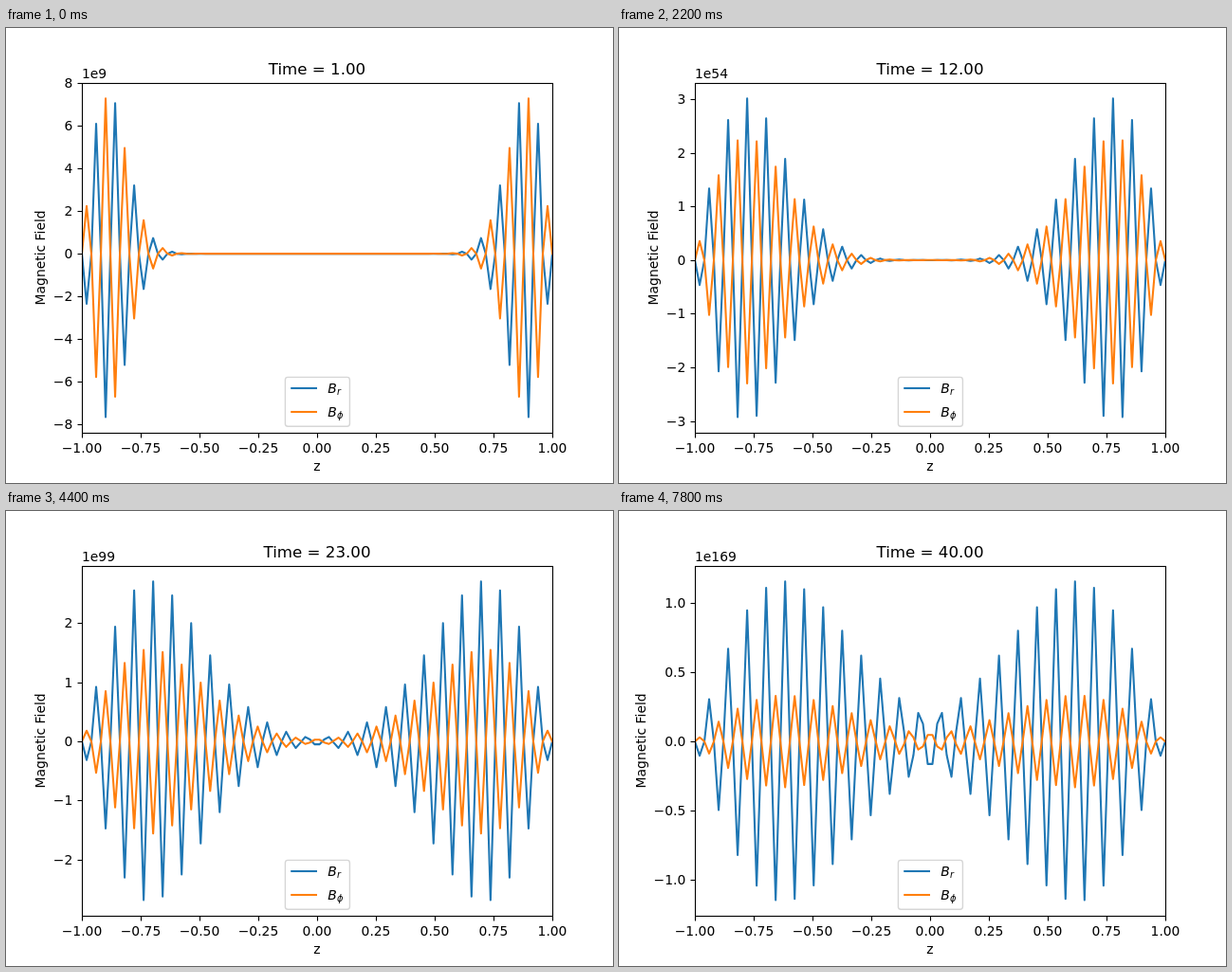
An HTML page with a canvas that plays this animation: 640x480 px, repeating every 8000 ms.

```html
<!DOCTYPE html>
<html lang="en">
<head>
<meta charset="utf-8">
<title>Magnetic field over time</title>
<style>
  html, body { margin: 0; width: 100%; height: 100%; overflow: hidden; background: #fff; }
  canvas { display: block; width: 640px; height: 480px; }
</style>
</head>
<body>
<canvas id="plot" width="640" height="480"></canvas>
<script>
const ctx = document.getElementById('plot').getContext('2d');

const STEP_MS = 200, STEPS = 40, POINTS = 100;
const LEFT = 80, RIGHT = 576, TOP = 57.6, BOTTOM = 427.2;
const WIDTH = RIGHT - LEFT, HEIGHT = BOTTOM - TOP;
const MID_X = (LEFT + RIGHT) / 2, MID_Y = (TOP + BOTTOM) / 2;
const PT = 100 / 72;
const BLUE = '#1f77b4', ORANGE = '#ff7f0e';
const FAMILY = '"DejaVu Sans", sans-serif';

const snap = v => Math.floor(v + 0.5) + 0.5;
const xAt = i => LEFT + WIDTH * i / (POINTS - 1);
const label = (v, digits) => v.toFixed(digits).replace('-', '\u2212');

function text(str, x, y, align = 'center', size = 10, style = '') {
  ctx.font = `${style} ${size * PT}px ${FAMILY}`;
  ctx.textAlign = align;
  ctx.fillText(str, x, y);
}

function line(points, color, width) {
  ctx.beginPath();
  points.forEach(([x, y]) => ctx.lineTo(x, y));
  ctx.strokeStyle = color;
  ctx.lineWidth = width;
  ctx.stroke();
}

// Alternating wave whose envelope spreads inward from both ends by diffusion.
function field(time) {
  const spread = 528 + 210 * time;
  const decay = 0.001 * Math.exp(-time / 28);
  const wave = [];
  for (let i = 0; i < POINTS; i++) {
    const k = i % 2 ? i : POINTS - 1 - i;
    const x = WIDTH * k / (POINTS - 1);
    const sign = k % 4 === 1 ? -1 : 1;
    wave.push(sign * x * Math.exp(-x * x / (2 * spread) - decay * x));
  }
  wave[0] = wave[POINTS - 1] = 0;

  const logPeak = 4.1089 * time + 8.656 - Math.log10(spread) - 0.012 * Math.exp(1 - time);
  const exponent = Math.floor(logPeak);
  const scale = 10 ** (logPeak - exponent) / Math.max(...wave.map(Math.abs));
  const ratio = 0.967 - 0.017 * time;
  const br = wave.map(v => v * scale);
  return { br, bphi: br.map(v => -v * ratio), exponent };
}

function ticksFor(lo, hi) {
  const raw = (hi - lo) / 9;
  const base = 10 ** Math.floor(Math.log10(raw));
  const step = base * [1, 2, 2.5, 5, 10].find(s => s * base >= raw);
  const ticks = [];
  for (let n = Math.ceil(lo / step); n <= Math.floor(hi / step); n++) ticks.push(n * step);
  const top = Math.max(...ticks.map(Math.abs));
  const order = Math.floor(Math.log10(top) + 1e-9);
  const unit = step / 10 ** order;
  let digits = 0;
  while (Math.abs(unit - +unit.toFixed(digits)) > 1e-6) digits++;
  return { ticks, order, digits };
}

function drawXAxis() {
  for (let n = -4; n <= 4; n++) {
    const x = MID_X + n * WIDTH / 8;
    line([[snap(x), snap(BOTTOM)], [snap(x), snap(BOTTOM) + 5]], '#000', 0.8 * PT);
    text(label(n / 4, 2), x, 448);
  }
  text('z', MID_X, 467);
}

function drawYAxis(lo, hi, exponent, yAt) {
  const { ticks, order, digits } = ticksFor(lo, hi);
  let widest = 0;
  for (const v of ticks) {
    const y = yAt(v), str = label(v / 10 ** order || 0, digits);
    line([[snap(LEFT), snap(y)], [snap(LEFT) - 5, snap(y)]], '#000', 0.8 * PT);
    text(str, LEFT - 7 * PT, Math.round(y + 5), 'right');
    widest = Math.max(widest, ctx.measureText(str).width);
  }
  text('1e' + (exponent + order), LEFT, 53, 'left');

  ctx.save();
  ctx.translate(Math.round(LEFT - 11 * PT - widest - 3.3), MID_Y);
  ctx.rotate(-Math.PI / 2);
  text('Magnetic Field', 0, 0);
  ctx.restore();
}

function drawLegend() {
  ctx.beginPath();
  ctx.roundRect(294.4, 368.4, 68, 51.8, 2.8);
  ctx.fillStyle = 'rgba(255,255,255,0.8)';
  ctx.fill();
  ctx.strokeStyle = 'rgba(204,204,204,0.8)';
  ctx.lineWidth = PT;
  ctx.stroke();
  ctx.fillStyle = '#000';
  [['r', BLUE, 380], ['\u03d5', ORANGE, 405]].forEach(([sub, color, y]) => {
    line([[300.2, y], [328, y]], color, 1.5 * PT);
    text('B', 339.3, y + 5, 'left', 10, 'italic');
    text(sub, 348.9, y + 7, 'left', 7, 'italic');
  });
}

function draw(time) {
  const { br, bphi, exponent } = field(time);
  const all = br.concat(bphi);
  const min = Math.min(...all), max = Math.max(...all);
  const pad = (max - min) * 0.05;
  const lo = min - pad, hi = max + pad;
  const yAt = v => BOTTOM - HEIGHT * (v - lo) / (hi - lo);

  ctx.fillStyle = '#fff';
  ctx.fillRect(0, 0, 640, 480);
  ctx.fillStyle = '#000';
  ctx.lineCap = 'butt';
  drawXAxis();
  drawYAxis(lo, hi, exponent, yAt);

  ctx.save();
  ctx.beginPath();
  ctx.rect(LEFT, TOP, WIDTH, HEIGHT);
  ctx.clip();
  ctx.lineJoin = 'round';
  ctx.lineCap = 'square';
  [[br, BLUE], [bphi, ORANGE]].forEach(([values, color]) =>
    line(values.map((v, i) => [xAt(i), yAt(v)]), color, 1.5 * PT));
  ctx.restore();

  ctx.strokeStyle = '#000';
  ctx.lineWidth = 0.8 * PT;
  ctx.strokeRect(snap(LEFT), snap(TOP), WIDTH, snap(BOTTOM) - snap(TOP));
  text('Time = ' + time.toFixed(2), MID_X, 49, 'center', 12);
  drawLegend();
}

const start = performance.now();
let shown = 0;
function tick() {
  const elapsed = Math.max(0, performance.now() - start);
  const time = Math.floor(elapsed / STEP_MS) % STEPS + 1;
  if (time !== shown) draw(shown = time);
  requestAnimationFrame(tick);
}
tick();
</script>
</body>
</html>
```
